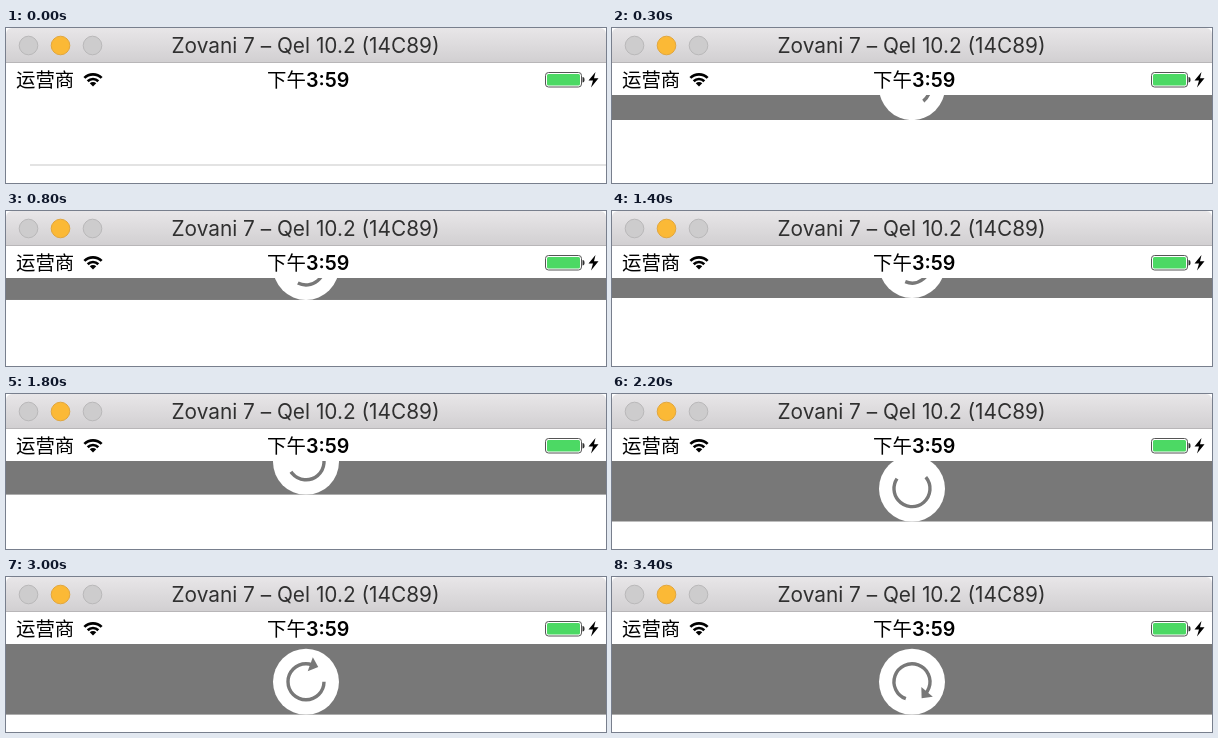
Recreate the animation shown at these times as an HTML page with a canvas. Size 600x155 px, loop 3.5 s.

```html
<!DOCTYPE html>
<html lang="zh">
<head>
<meta charset="utf-8">
<title>Pull to refresh</title>
<style>
html, body { margin: 0; width: 100%; height: 100%; overflow: hidden; background: #fff; }
canvas { display: block; width: 600px; height: 155px; }
</style>
</head>
<body>
<canvas id="stage"></canvas>
<script>
const W = 600, H = 155, LOOP = 3500, STEP = 100;
const BAR = 35, TOP = 67, CX = 300, R = 33, RING = 18;
const SPIN_AT = 2500, SPIN_SPEED = 0.275;
const GREY = '#787878';
const CJK = '"Noto Sans CJK SC", "Noto Sans CJK", sans-serif';
const FONT = 'Inter, ' + CJK;

const canvas = document.getElementById('stage');
const ctx = canvas.getContext('2d');
const dpr = window.devicePixelRatio || 1;
canvas.width = W * dpr;
canvas.height = H * dpr;

const rad = deg => deg * Math.PI / 180;
const ramp = (t, from, to) => Math.min(1, Math.max(0, (t - from) / (to - from)));
const smooth = x => x * x * (3 - 2 * x);
const easeOut = x => 1 - (1 - x) ** 1.5;

// A quick tug, a partial release, then the full pull
const pullAt = t => 38.8 * easeOut(ramp(t, 0, 600))
  - 18.8 * smooth(ramp(t, 600, 850))
  + 50.8 * smooth(ramp(t, 1430, 2510));

// The ring grows with the pull, trailing behind the first tug
const sweepAt = t => -40 + (102 + 2.5 * pullAt(t)) * smooth(ramp(t, 0, 560));

const headAt = t => 180 + (t - SPIN_AT - STEP) * SPIN_SPEED;

function fill(color) {
  ctx.fillStyle = color;
  ctx.fill();
}

function stroke(color, width) {
  ctx.strokeStyle = color;
  ctx.lineWidth = width;
  ctx.stroke();
}

function rect(x, y, w, h, color) {
  ctx.fillStyle = color;
  ctx.fillRect(x, y, w, h);
}

function disc(x, y, r, color) {
  ctx.beginPath();
  ctx.arc(x, y, r, 0, 2 * Math.PI);
  fill(color);
}

function poly(points, color) {
  ctx.beginPath();
  points.forEach(p => ctx.lineTo(...p));
  ctx.closePath();
  fill(color);
}

function box(x, y, w, h, r) {
  ctx.beginPath();
  ctx.roundRect(x, y, w, h, r);
}

function text(str, x, y, font, color, align = 'left') {
  ctx.font = font;
  ctx.textAlign = align;
  ctx.fillStyle = color;
  ctx.fillText(str, x, y);
}

function arc(x, y, r, from, to, color, width) {
  ctx.beginPath();
  ctx.arc(x, y, r, rad(from), rad(to));
  stroke(color, width);
}

function drawTitleBar() {
  const g = ctx.createLinearGradient(0, 0, 0, BAR);
  g.addColorStop(0, '#e8e6e8');
  g.addColorStop(1, '#d1cfd1');
  box(0, 0, W, BAR, [6, 6, 0, 0]);
  fill(g);
  rect(0, BAR - 1, W, 1, '#b8b6b8');
  ['#cdcccd', '#fbb936', '#cdcccd'].forEach((color, i) => {
    disc(22.5 + 32 * i, 17.5, 9.3, color);
    stroke(i === 1 ? '#e2a63c' : '#b9b8b9', 1);
  });
  text('Zovani 7 – Qel 10.2 (14C89)', 299.5, 25, '400 20.8px ' + FONT, '#303030', 'center');
}

function drawWifi(x, y) {
  for (const r of [2.3, 7.5, 12.2]) arc(x, y, r, -135, -45, '#000', r < 3 ? 4.6 : 2.7);
}

function drawBattery() {
  box(539.5, 44.5, 36, 14.5, 3);
  stroke('#555', 1);
  box(541, 46, 33, 11.5, 1.5);
  fill('#4cd964');
  box(576.5, 49, 2, 5.5, [0, 2, 2, 0]);
  fill('#333');
  poly([[589.5, 44], [582.5, 52.5], [587, 52.5], [585, 59.5], [592.5, 50.3], [588, 50.3]], '#000');
}

function drawStatus() {
  rect(0, BAR, W, TOP - BAR, '#fff');
  text('运营商', 10, 58.5, '400 19.4px ' + CJK, '#000');
  drawWifi(87, 58.5);
  text('下午', 261, 58.5, '500 19.4px ' + CJK, '#000');
  text('3:59', 300, 58.5, '600 19.7px ' + FONT, '#000');
  drawBattery();
}

function drawRing(y, from, to) {
  arc(CX, y, RING, from, to, GREY, 3.4);
}

function drawArrow(y, head) {
  drawRing(y, head - 290, head);
  ctx.save();
  ctx.translate(CX, y);
  ctx.rotate(rad(head));
  poly([[RING - 7.5, -2], [RING + 7.5, -2], [RING, 6.5]], GREY);
  ctx.restore();
}

function drawPull(t) {
  const pull = pullAt(t), y = TOP + pull - R;
  rect(24, 136.5 + pull, W - 24, 1, '#c8c8c8');
  if (!pull) return;
  ctx.save();
  ctx.beginPath();
  ctx.rect(0, TOP, W, pull);
  ctx.clip();
  rect(0, TOP, W, pull, GREY);
  disc(CX, y, R, '#fff');
  if (t < SPIN_AT) drawRing(y, -40, sweepAt(t));
  else drawArrow(y, headAt(t));
  ctx.restore();
}

function draw(now) {
  const t = Math.floor((now % LOOP) / STEP) * STEP;
  ctx.setTransform(dpr, 0, 0, dpr, 0, 0);
  rect(0, 0, W, H, '#fff');
  drawPull(t);
  drawStatus();
  drawTitleBar();
}

let start;
function tick(now) {
  start ??= now;
  draw(Math.max(0, now - start));
  requestAnimationFrame(tick);
}
requestAnimationFrame(tick);
</script>
</body>
</html>
```
